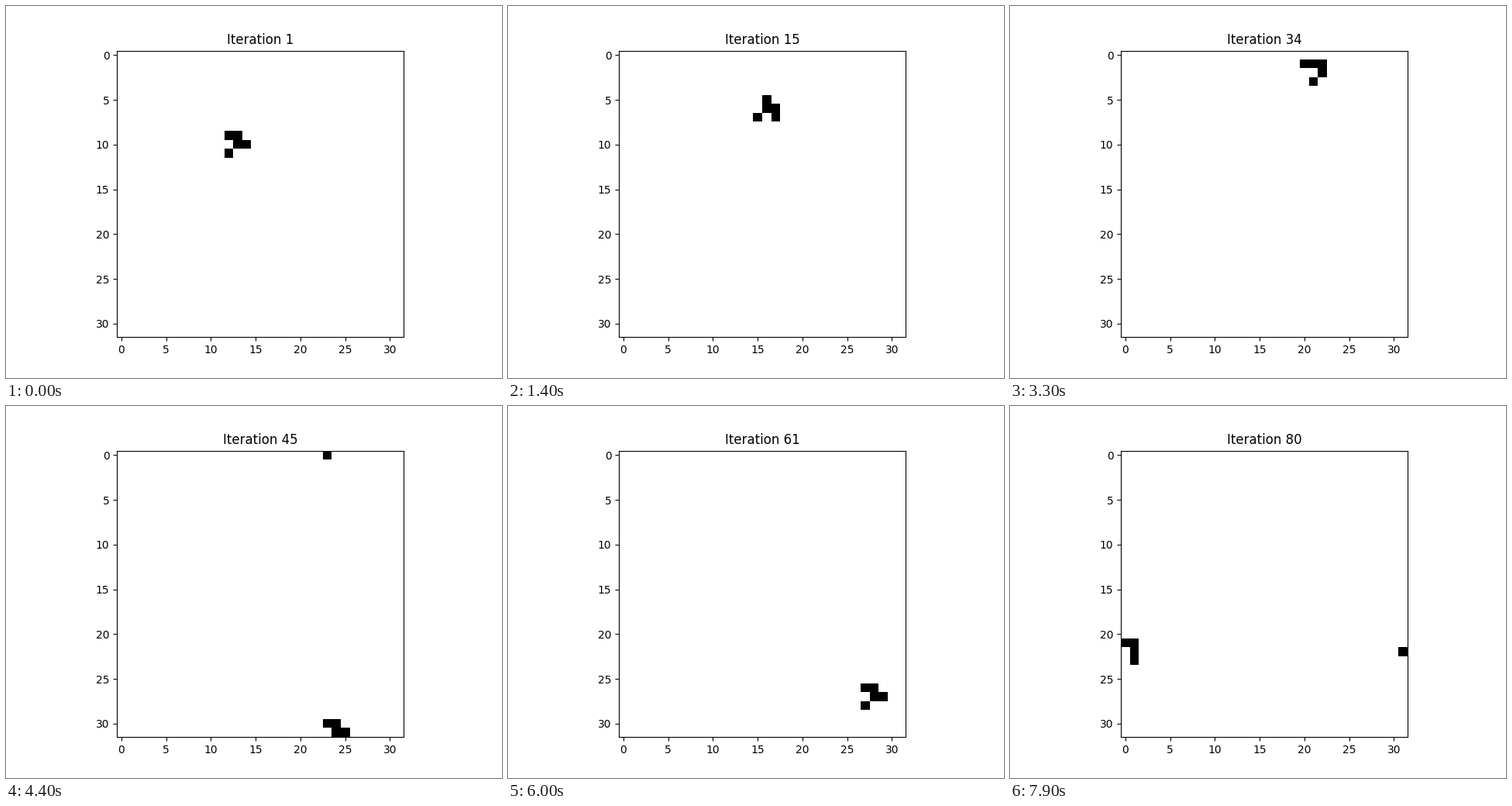
A matplotlib script that plays this animation: 640x480 px, repeating every 8 s.

```python
import numpy as np
import matplotlib.pyplot as plt
from matplotlib.animation import FuncAnimation

SIZE = 32
FRAMES = 80
INTERVAL = 100
GLIDER = [(9, 12), (9, 13), (10, 13), (10, 14), (11, 12)]


def evolve(grid):
    """One Game of Life generation on a torus."""
    shifts = [(dy, dx) for dy in (-1, 0, 1) for dx in (-1, 0, 1) if (dy, dx) != (0, 0)]
    neighbours = sum(np.roll(grid, s, axis=(0, 1)) for s in shifts)
    return ((neighbours == 3) | ((grid == 1) & (neighbours == 2))).astype(int)


def history():
    grid = np.zeros((SIZE, SIZE), dtype=int)
    grid[tuple(zip(*GLIDER))] = 1
    grids = [grid]
    while len(grids) < FRAMES:
        grids.append(evolve(grids[-1]))
    return grids


generations = history()

fig, ax = plt.subplots(figsize=(6.4, 4.8), dpi=100)
image = ax.imshow(generations[0], cmap="binary", vmin=0, vmax=1)
title = ax.set_title("Iteration 1")


def update(i):
    image.set_data(generations[i])
    title.set_text(f"Iteration {i + 1}")
    return image, title


anim = FuncAnimation(fig, update, frames=FRAMES, interval=INTERVAL, repeat=True)
plt.show()
```
